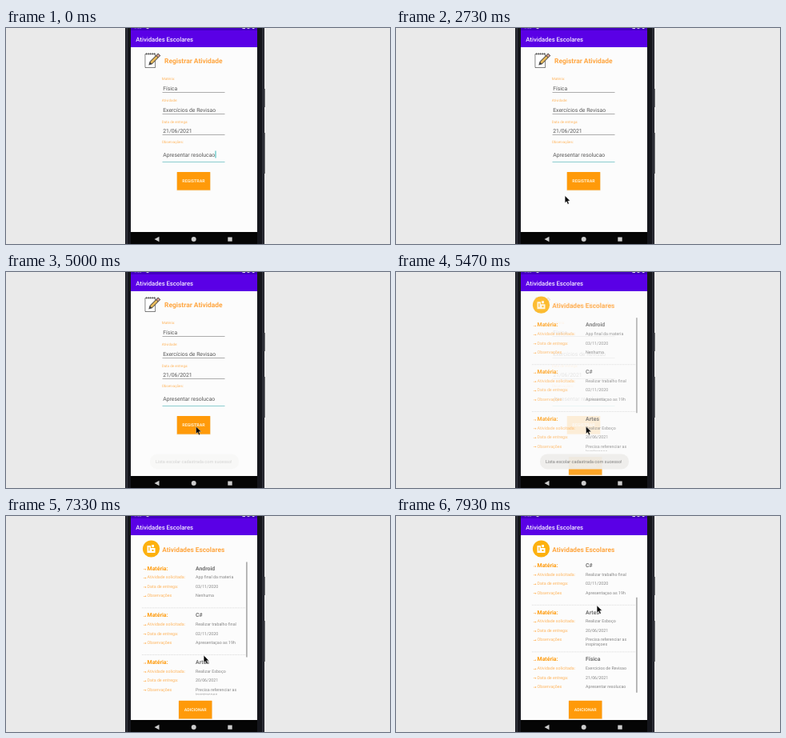
An HTML page with a canvas that plays this animation: 480x270 px, repeating every 8 s.

```html
<!DOCTYPE html>
<html lang="pt">
<head>
<meta charset="utf-8">
<title>Atividades Escolares</title>
<style>
html, body { margin: 0; width: 100%; height: 100%; overflow: hidden; background: #eaeaea; }
canvas { display: block; }
</style>
</head>
<body>
<canvas id="stage" width="480" height="270"></canvas>
<script>
const ctx = document.getElementById('stage').getContext('2d');
ctx.textRendering = 'geometricPrecision';
const LOOP = 8000;
const ORANGE = '#ff9a0a', SOFT = '#ffa640', PALE = '#ffb45c', PAPER = '#fcfcfc';

const fields = [
  ['Matéria:', 'Física', 65.2, 77.6, 80.5],
  ['Atividade:', 'Exercícios de Revisao', 92, 104.6, 107.5],
  ['Data de entrega:', '21/06/2021', 118.5, 130.8, 133.5],
  ['Observações:', 'Apresentar resolucao', 144.2, 160.8, 167.5],
];
const tasks = [
  ['Android', 'App final da materia', '03/11/2020', 'Nenhuma'],
  ['C#', 'Realizar trabalho final', '02/11/2020', 'Apresentaçao as 19h'],
  ['Artes', 'Realizar Esboço', '20/06/2021', 'Precisa referenciar as', 'inspiraçoes'],
  ['Física', 'Exercicios de Revisao', '21/06/2021', 'Apresentar resolucao'],
];
const labels = ['Matéria:', 'Atividade solicitada:', 'Data de entrega:', 'Observações'];

// Pointer path: time, x, y
const path = [
  [1270, 309, 266], [1530, 252, 232], [1800, 194.6, 197.5], [2070, 184, 213],
  [2400, 190, 226], [2930, 224, 200], [3330, 234, 193], [3600, 237.6, 193.3],
  [6130, 237.6, 193.3], [6600, 250, 163.5], [6950, 248, 184], [7250, 247, 180],
  [7600, 248, 155.5], [7930, 251.2, 112], [8000, 251.5, 109.5],
];

const clamp = v => Math.max(0, Math.min(1, v));
const ramp = (t, start, length) => clamp((t - start) / length);

function rect(x, y, w, h, color) {
  ctx.fillStyle = color;
  ctx.fillRect(x, y, w, h);
}

function rounded(x, y, w, h, r, color) {
  ctx.fillStyle = color;
  ctx.beginPath();
  ctx.roundRect(x, y, w, h, r);
  ctx.fill();
}

function disc(x, y, r, color) {
  ctx.fillStyle = color;
  ctx.beginPath();
  ctx.arc(x, y, r, 0, 7);
  ctx.fill();
}

function polygon(points, color) {
  ctx.fillStyle = color;
  ctx.beginPath();
  points.forEach(([x, y]) => ctx.lineTo(x, y));
  ctx.closePath();
  ctx.fill();
}

function text(str, x, y, size, color, weight = 400, align = 'left') {
  ctx.font = `${weight} ${size}px Roboto, sans-serif`;
  ctx.textAlign = align;
  ctx.fillStyle = color;
  ctx.fillText(str, x, y);
}

function pointerAt(t) {
  const i = path.findIndex(p => p[0] >= t);
  if (i < 1) return null;
  const [t0, x0, y0] = path[i - 1], [t1, x1, y1] = path[i];
  const k = (t - t0) / (t1 - t0);
  return [x0 + (x1 - x0) * k, y0 + (y1 - y0) * k];
}

function button(label, x, y) {
  rect(x - 0.4, y + 0.4, 42.3, 23, '#f3e3cb');
  rect(x, y, 41.4, 22.6, ORANGE);
  text(label, x + 20.7, y + 13, 5.3, '#fff0d2', 700, 'center');
}

function notebook() {
  rounded(173.6, 32, 13.4, 18, 1.2, '#555');
  rounded(174.3, 32.7, 12, 16.6, 0.8, '#fff');
  for (let x = 175.3; x < 186; x += 2.5) rect(x, 31, 0.9, 2.6, '#555');
  ctx.save();
  ctx.translate(178.3, 46.5);
  ctx.rotate(-0.79);
  polygon([[0, 0], [4, -2.2], [19, -2.2], [19, 2.2], [4, 2.2]], '#444');
  rect(4.2, -1.4, 10.6, 2.8, '#e8bb5c');
  rect(15.6, -1.4, 2.6, 2.8, '#d9a090');
  ctx.restore();
}

function form(t) {
  rect(156, 24, 158, 231, PAPER);
  notebook();
  text('Registrar Atividade', 198, 44.2, 8.45, SOFT, 700);
  fields.forEach(([label, value, labelY, valueY, lineY], i) => {
    text(label, 194.7, labelY, 4.5, PALE);
    text(value, 196.2, valueY, 6.85, '#585858');
    rect(195.5, lineY - 0.5, 78, i == 3 ? 1 : 0.9, i == 3 ? '#8ccdd0' : '#a4a4a4');
  });
  if (t < 4900 && t % 1000 < 470) rect(261.5, 153.5, 1, 9, '#35b8b8');
  button('REGISTRAR', 213.8, 180);
}

function task(item, top) {
  labels.forEach((label, row) => {
    const head = row == 0;
    const y = top + (head ? 2.5 : 2 + row * 11.4);
    const size = head ? 6.9 : 5.3, weight = head ? 700 : 400;
    rect(171.8, y - 1.2, 3, 0.6, PALE);
    polygon([[174, y - 1.9], [175.5, y - 0.9], [174, y + 0.1]], PALE);
    text(label, 176.6, y, size, head ? ORANGE : PALE, weight);
    text(item[row], 237, y, size, head ? '#707070' : '#858585', weight);
  });
  if (item[4]) text(item[4], 237, top + 42.2, 5.3, '#858585');
  for (let x = 170; x < 299; x += 2) rect(x, top + 49.5, 1, 0.7, '#ccc');
}

function list(scroll) {
  rect(156, 24, 158, 231, PAPER);
  disc(181.5, 41, 10.6, '#fdb10f');
  polygon([[176.5, 37], [181, 37], [181, 40], [186.5, 40], [186.5, 46], [176.5, 46]], '#fff');
  polygon([[182, 39], [182, 36], [185, 36], [185, 39]], '#fff');
  rect(178.3, 39, 1.2, 4.5, '#fdb10f');
  rect(182.5, 42, 2, 2, '#fdb10f');
  text('Atividades Escolares', 195.3, 45, 8.3, SOFT, 700);
  ctx.save();
  ctx.beginPath();
  ctx.rect(156, 56.5, 158, 167);
  ctx.clip();
  tasks.forEach((item, i) => task(item, 65.7 + i * 58.7 - scroll));
  rect(300, 57 + scroll * 0.71, 1.8, 119, '#b0b0b0');
  ctx.restore();
  button('ADICIONAR', 216, 230.8);
}

function toast(alpha) {
  ctx.save();
  ctx.globalAlpha = alpha;
  rounded(180, 227.6, 111, 18.8, 9, '#eeedeb');
  text('Lista escolar cadastrada com sucesso!', 234.7, 238.9, 5.5, '#777', 400, 'center');
  ctx.restore();
}

function phone() {
  rect(0, 0, 480, 270, '#eaeaea');
  rect(149, 0, 174, 270, '#15161c');
  rect(150.6, 0, 1, 270, '#4a4c56');
  rect(320.6, 0, 1, 270, '#4a4c56');
  rect(322, 76, 1.6, 23, '#24252c');
  rect(322, 131, 1.6, 51, '#24252c');
}

function bars() {
  rect(156, 0, 158, 3, '#4300c0');
  rect(156, 3, 158, 21, '#5a00e6');
  text('1:49', 160, 1.2, 5, '#ddd');
  disc(177, -1, 2, '#ddd');
  polygon([[295, 1], [299, 1], [299, -3]], '#ddd');
  disc(303, -1, 2, '#ddd');
  rect(308, -2, 2.5, 3, '#ddd');
  text('Atividades Escolares', 162.3, 16.6, 7.7, '#f4eeff', 500);
  rect(156, 255, 158, 15, '#050505');
  polygon([[185.5, 264], [191.5, 260.8], [191.5, 267.2]], '#ccc');
  disc(234.7, 264, 3, '#ccc');
  rect(277.3, 261.5, 5.4, 5.2, '#ccc');
}

function pointer([x, y]) {
  const shape = [[0, 0], [0, 8.8], [2, 7], [3.5, 10.4], [5, 9.7], [3.5, 6.4], [6.3, 6.3]];
  polygon(shape.map(([dx, dy]) => [x + dx, y + dy]), '#000');
  ctx.strokeStyle = 'rgba(255,255,255,.7)';
  ctx.lineWidth = 0.5;
  ctx.stroke();
}

function draw(t) {
  const at = pointerAt(t);
  const scroll = t > 7250 ? Math.max(0, Math.min(65.6, 175 - at[1])) : 0;
  const open = ramp(t, 5130, 400);
  const toastAlpha = 0.94 * Math.min(ramp(t, 4930, 230), 1 - ramp(t, 7000, 200));

  phone();
  if (open < 1) form(t);
  if (open > 0) {
    ctx.save();
    ctx.beginPath();
    ctx.rect(156, 24, 158, 231);
    ctx.clip();
    ctx.globalAlpha = open;
    ctx.translate(0, 10 * (1 - open) ** 2);
    list(scroll);
    ctx.restore();
  }
  bars();
  if (toastAlpha > 0) toast(toastAlpha);
  if (at) pointer(at);
}

function frame() {
  draw(performance.now() % LOOP);
  requestAnimationFrame(frame);
}
frame();
</script>
</body>
</html>
```
